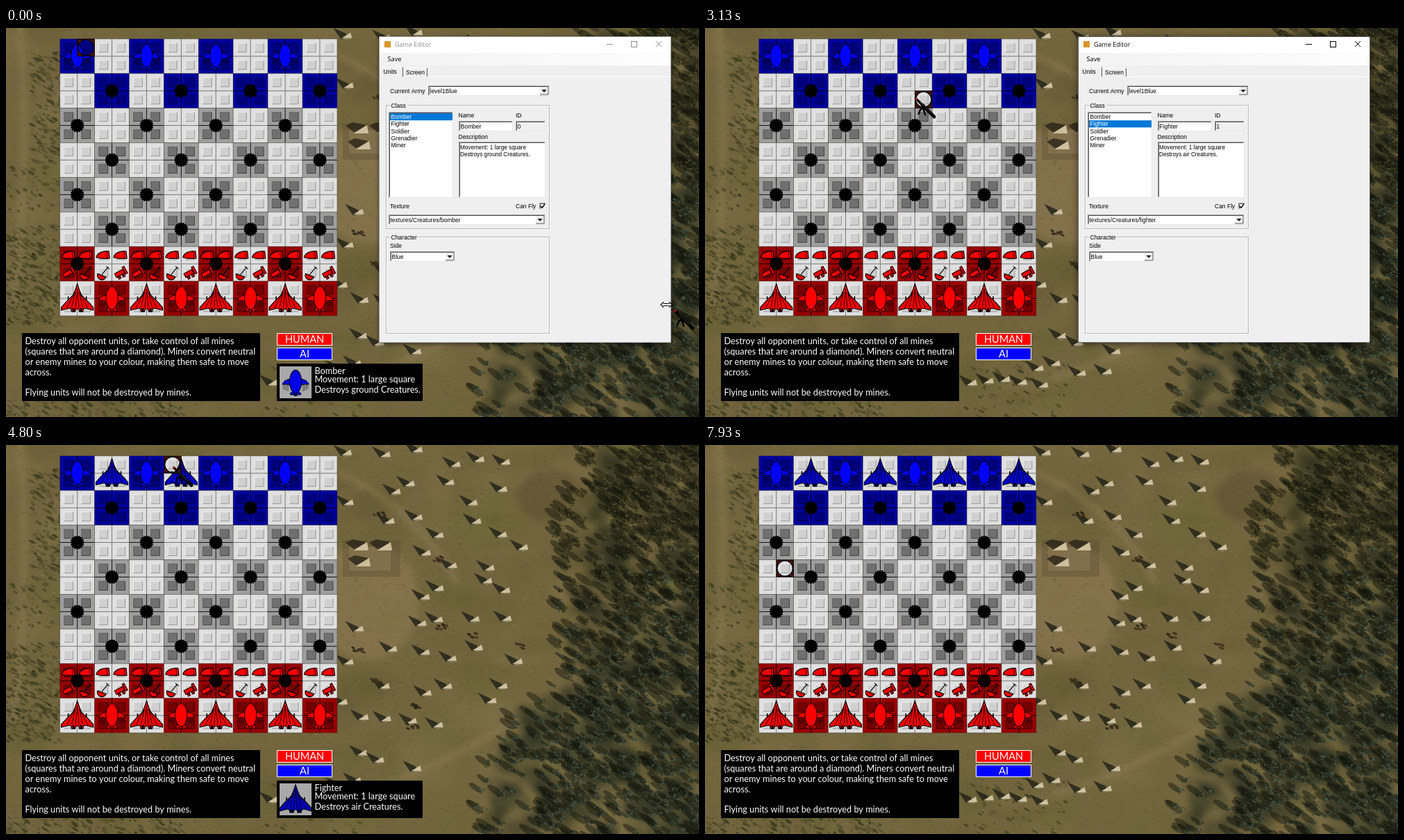
Recreate the animation shown at these times as an HTML page with a canvas. Size 998 px wide and 561 px high, loop 8000 ms.

```html
<!DOCTYPE html>
<html lang="en">
<head>
<meta charset="utf-8">
<title>Board game editor</title>
<style>
html, body { margin: 0; width: 100%; height: 100%; overflow: hidden; background: #6c6039; }
canvas { display: block; }
</style>
</head>
<body>
<canvas id="stage" width="998" height="561"></canvas>
<script>
const W = 998, H = 561, LOOP = 8000, STEP = 200 / 3;
const BX = 77.7, BY = 15.8, CELL = 49.9, HALF = CELL / 2;
const BLUE = '#0000ff', RED = '#ff0000';
const SANS = '"Liberation Sans", Arial, sans-serif';
const UI = '"Open Sans", sans-serif';
const GAME = 'Lato, sans-serif';
const stage = document.getElementById('stage').getContext('2d');

let seed = 7;
const rnd = () => (seed = (seed * 16807) % 2147483647) / 2147483647;
const span = (a, b) => a + (b - a) * rnd();
const pick = list => list[Math.floor(rnd() * list.length)];
const smooth = u => { u = Math.min(1, Math.max(0, u)); return u * u * (3 - 2 * u); };
const repeat = (n, f) => { for (let i = 0; i < n; i++) f(i); };

function layer(paint) {
  const cv = document.createElement('canvas');
  cv.width = W; cv.height = H;
  paint(cv.getContext('2d'));
  return cv;
}
function rect(g, x, y, w, h, fill, line) {
  if (fill) { g.fillStyle = fill; g.fillRect(x, y, w, h); }
  if (line) { g.strokeStyle = line; g.lineWidth = 1; g.strokeRect(x + .5, y + .5, w - 1, h - 1); }
}
function poly(g, pts, fill, line, width = 1) {
  g.beginPath();
  pts.forEach(([x, y]) => g.lineTo(x, y));
  g.closePath();
  if (fill) { g.fillStyle = fill; g.fill(); }
  if (line) { g.strokeStyle = line; g.lineWidth = width; g.stroke(); }
}
function stroke(g, pts, color, width = 1) {
  g.beginPath();
  pts.forEach(([x, y]) => g.lineTo(x, y));
  g.strokeStyle = color; g.lineWidth = width;
  g.stroke();
}
function oval(g, x, y, rx, ry, fill, line, width = 1, turn = 0) {
  g.beginPath();
  g.ellipse(x, y, rx, ry, turn, 0, 7);
  if (fill) { g.fillStyle = fill; g.fill(); }
  if (line) { g.strokeStyle = line; g.lineWidth = width; g.stroke(); }
}
function text(g, s, x, y, size, font, color = '#000', align = 'left') {
  g.font = size + 'px ' + font;
  g.textAlign = align;
  g.fillStyle = color;
  g.fillText(s, x, y);
}
function at(g, x, y, scale, paint) {
  g.save();
  g.translate(x, y); g.scale(scale, scale);
  paint(g);
  g.restore();
}

// ---------- terrain ----------
const forestEdge = y => 793 + 33 * Math.exp(-y / 60) - 115 * smooth((y - 310) / 160) + 10 * Math.sin(y / 23);

function ground(g) {
  rect(g, 0, 0, W, H, '#72653e');
  repeat(450, () => {
    g.globalAlpha = span(.08, .28);
    oval(g, rnd() * W, rnd() * H, span(10, 50), span(8, 30), pick(['#5f5630', '#84744c', '#786a42', '#66642f']));
  });
  g.globalAlpha = .5;
  oval(g, 520, 225, 75, 85, '#937d56');
  oval(g, 785, 75, 50, 38, '#5f4e33');
  g.lineWidth = 8; g.strokeStyle = '#94815a';
  g.beginPath();
  g.moveTo(478, 40); g.quadraticCurveTo(590, 90, 650, 200);
  g.moveTo(500, 505); g.quadraticCurveTo(620, 470, 740, 392);
  g.moveTo(20, 0); g.quadraticCurveTo(35, 200, 10, 400);
  g.stroke();
  repeat(500, () => {
    const y = rnd() * H, x = forestEdge(y) + 25 + rnd() * 320;
    g.globalAlpha = span(.2, .45);
    oval(g, x, y, span(8, 28), span(6, 18), y > 240 ? '#20271c' : '#25261a', 0, 1, .5);
  });
  g.globalAlpha = 1;
  g.filter = 'blur(5px)';
  g.drawImage(g.canvas, 0, 0);
  g.filter = 'none';
  repeat(6500, () => {
    g.globalAlpha = span(.05, .2);
    rect(g, rnd() * W, rnd() * H, span(1, 5), span(1, 3), pick(['#3c3a1c', '#a08e64', '#50502a']));
  });
  g.globalAlpha = 1;
}
function grove(g, x, y, w, h, n) {
  repeat(n, () => {
    g.globalAlpha = span(.25, .7);
    oval(g, x + rnd() * w, y + rnd() * h, span(1.5, 6), span(1, 2.3),
      pick(['#2c2f18', '#3b3d1f', '#474722', '#6a623b']), 0, 1, .5);
  });
  g.globalAlpha = 1;
}
function tree(g, x, y, s) {
  const cool = rnd() < (y - 120) / 260;
  g.globalAlpha = .45;
  oval(g, x - s, y - s * .6, s * 1.7, s * .6, '#11140c', 0, 1, .6);
  repeat(16, () => {
    const a = rnd() * 7, d = s * rnd();
    g.globalAlpha = span(.25, .75);
    oval(g, x + d * Math.cos(a), y + d * Math.sin(a) * .8, span(.7, 2.4), span(.6, 1.6),
      pick(cool ? ['#1c231a', '#2d382a', '#3e4a3a', '#53614f'] : ['#1d1f13', '#35341e', '#474225', '#5d532f']), 0, 1, .6);
  });
}
function forest(g) {
  repeat(1250, () => {
    const y = rnd() * (H + 10), x0 = forestEdge(y), x = x0 + rnd() * (W + 8 - x0);
    if (x - x0 > 80 || rnd() < .5) tree(g, x, y, span(3, 9));
  });
  g.globalAlpha = 1;
}
function tent(g, x, y) {
  g.globalAlpha = .85;
  poly(g, [[x + 2, y + 4], [x - 9, y + 4], [x - 20, y - 12], [x - 2, y - 4]], '#25241a');
  g.globalAlpha = 1;
  poly(g, [[x - 8, y + 3], [x + 5, y - 5], [x + 7, y + 3]], '#cdc1a0');
  poly(g, [[x - 8, y + 3], [x + 7, y + 3], [x - 1, y + 5]], '#8f8564');
}
function camp(g) {
  repeat(66, i => {
    const x = 500 + (i % 6) * 46 + span(-16, 16), y = 20 + Math.floor(i / 6) * 48 + span(-16, 16);
    const bare = x < 590 && y > 115 && y < 255;
    if (!bare && x < forestEdge(y) - 50) tent(g, x, y);
  });
  repeat(6, i => tent(g, 385 + i * 24, 497 + span(-16, 16)));
  repeat(9, () => {
    const x = span(490, 750), y = span(45, 440);
    repeat(8, () => oval(g, x + span(-8, 8), y + span(-4, 4), 3, 1.5, pick(['#2c2a18', '#4a3521']), 0, 1, .4));
  });
  rect(g, 485, 137, 83, 53, 'rgba(92,76,48,.4)');
  rect(g, 494, 147, 60, 34, 'rgba(140,122,86,.6)');
  [[511, 146], [545, 146], [514, 169]].forEach(([x, y]) => {
    poly(g, [[x - 8, y + 6], [x - 22, y - 5], [x - 12, y - 10], [x + 8, y - 6]], 'rgba(36,32,20,.75)');
    poly(g, [[x - 11, y + 6], [x + 9, y - 6], [x + 11, y + 6]], '#cdbf9c');
  });
}
function terrain(g) {
  ground(g);
  grove(g, 36, 35, 45, 160, 230);
  grove(g, 0, 195, 82, 70, 70);
  grove(g, 0, 285, 82, 145, 400);
  grove(g, 0, 538, 260, 23, 160);
  grove(g, 375, 480, 150, 80, 70);
  forest(g);
  camp(g);
}

// ---------- units, drawn in a 50 x 50 box around the origin ----------
function bomber(g, col) {
  for (const s of [-1, 1]) {
    repeat(4, i => stroke(g, [[s * (11 + i * 2.2), 2], [s * (11 + i * 2.2), 13 - i]], 'rgba(0,0,0,.7)', .8));
    g.beginPath();
    g.moveTo(s * 7, -5);
    g.quadraticCurveTo(s * 17, -4, s * 19, 3);
    g.quadraticCurveTo(s * 13, 2, s * 8, 4);
    g.fillStyle = col; g.fill();
    g.strokeStyle = '#000'; g.lineWidth = .9; g.stroke();
    poly(g, [[s * 2, 12], [s * 8, 16], [s * 7, 18], [s * 2, 18]], col, '#000', .9);
  }
  rect(g, -2, 14, 4, 6, col, '#000');
  oval(g, 0, -1, 8.7, 17, col, '#000', 1);
  g.beginPath();
  g.arc(0, -11, 5, Math.PI, 0);
  g.strokeStyle = 'rgba(0,0,0,.5)'; g.lineWidth = 1; g.stroke();
}
function fighter(g, col) {
  const side = [[3, -12], [6, -5], [16, 5], [23, 13], [23, 17], [12, 14], [9, 15], [8, 19], [3, 19], [2, 15]];
  const back = side.map(([x, y]) => [-x, y]).reverse();
  for (const s of [-1, 1]) stroke(g, [[s * 13, -3], [s * 13, 8]], '#000', 1.6);
  poly(g, [[0, -21], ...side, ...back], col, '#000', 1.2);
  for (const s of [-1, 1]) {
    for (const x of [8, 15]) stroke(g, [[s * 3, -9], [s * x, 13]], '#000', .9);
    rect(g, s * 5.5 - 1.5, 14, 3, 5, '#000');
  }
  stroke(g, [[-2.5, 13], [0, -14], [2.5, 13]], '#000', .9);
}
function shell(g, col) {
  g.beginPath();
  g.moveTo(8, -5.5);
  g.bezierCurveTo(0, -7, -9, -3, -10, 3);
  g.bezierCurveTo(-6, 5, 0, 5, 9, 4.5);
  g.closePath();
  g.fillStyle = col; g.fill();
  g.strokeStyle = '#000'; g.lineWidth = 1.2; g.stroke();
  stroke(g, [[5, -5], [6, 4]], '#000', .8);
}
function cannon(g, col) {
  g.rotate(-.5);
  rect(g, -9, -3, 14, 7, col, '#000');
  rect(g, 5, -6, 4, 12, col, '#000');
  rect(g, -7, 4, 4, 4, col, '#000');
  rect(g, 0, 4, 4, 4, col, '#000');
}
function shovel(g, col) {
  stroke(g, [[7, -8], [-2, 3]], '#000', 1.1);
  stroke(g, [[4, -9], [9, -5]], '#000', 1.1);
  g.beginPath();
  g.arc(-2, 4, 6.5, .4, 3.5);
  g.closePath();
  g.fillStyle = col; g.fill();
  g.strokeStyle = '#000'; g.lineWidth = 1.2; g.stroke();
}

// ---------- board ----------
const mid = n => n * CELL + HALF;
const unit = (g, paint, c, r, col) => at(g, BX + mid(c), BY + mid(r), 1, q => paint(q, col));

function tile(g, c, r) {
  const x = BX + c * CELL, y = BY + r * CELL, dark = (c + r) % 2 === 0;
  const [base, inner] = !dark ? ['#dfdfdf', '#d0d0d0']
    : r < 2 ? ['#00009c', '#00007c'] : r > 5 ? ['#980000', '#740000'] : ['#9e9e9e', '#707070'];
  rect(g, x, y, CELL, CELL, base);
  repeat(4, i => {
    const sx = x + (i % 2) * HALF + 6, sy = y + (i >> 1) * HALF + 6;
    rect(g, sx, sy, 13, 13, inner);
    stroke(g, [[sx, sy + 13], [sx, sy], [sx + 13, sy]], dark ? 'rgba(0,0,0,.25)' : '#ececec');
    stroke(g, [[sx + 13, sy], [sx + 13, sy + 13], [sx, sy + 13]], dark ? 'rgba(0,0,0,.5)' : '#999');
  });
  const mx = x + HALF, my = y + HALF, ink = dark ? 'rgba(0,0,0,.9)' : '#777';
  stroke(g, [[mx, y], [mx, y + CELL]], ink);
  stroke(g, [[x, my], [x + CELL, my]], ink);
  g.strokeStyle = 'rgba(40,40,40,.5)'; g.lineWidth = .7;
  g.strokeRect(x, y, CELL, CELL);
  if (dark && r > 0 && r < 7) {
    const star = Array.from({ length: 32 }, (_, i) => {
      const a = i * Math.PI / 16, d = i % 2 ? 8.8 : 10.4;
      return [mx + d * Math.cos(a), my + d * Math.sin(a)];
    });
    poly(g, star, '#000');
  }
}
function board(g) {
  repeat(64, i => tile(g, i % 8, i >> 3));
  repeat(8, c => {
    const odd = c % 2;
    const squad = [shell, shell, odd ? shovel : cannon, odd ? cannon : shovel];
    squad.forEach((paint, i) => unit(g, paint, c - .25 + (i % 2) / 2, 5.75 + (i >> 1) / 2, RED));
    unit(g, odd ? bomber : fighter, c, 7, RED);
    if (!odd) unit(g, bomber, c, 0, BLUE);
  });
}
function captions(g) {
  rect(g, 23, 440, 343, 98, '#000');
  ['Destroy all opponent units, or take control of all mines',
   '(squares that are around a diamond). Miners convert neutral',
   'or enemy mines to your colour, making them safe to move',
   'across.', '', 'Flying units will not be destroyed by mines.'
  ].forEach((s, i) => text(g, s, 27.5, 456.3 + i * 14.8, 12.7, GAME, '#fff'));
  [['HUMAN', 440, RED], ['AI', 461, BLUE]].forEach(([s, y, col]) => {
    rect(g, 390, y, 80, 18, col, '#fff');
    text(g, s, 430, y + 14, 14.5, GAME, '#fff', 'center');
  });
}

// ---------- editor window ----------
const label = (g, s, x, y, col) => text(g, s, x, y, 8.5, SANS, col);
function field(g, x, y, w, h, fill = '#fff') {
  rect(g, x, y, w, h, fill, '#a0a0a0');
  stroke(g, [[x + 1.5, y + h - 1.5], [x + 1.5, y + 1.5], [x + w - 1.5, y + 1.5]], '#555');
  stroke(g, [[x + w - .5, y], [x + w - .5, y + h - .5], [x, y + h - .5]], '#e8e8e8');
}
function combo(g, x, y, w, s) {
  field(g, x, y, w, 15);
  label(g, s, x + 2.5, y + 10.7);
  const bx = x + w - 14;
  rect(g, bx, y + 2, 12, 11, '#f0f0f0');
  stroke(g, [[bx + 12, y + 2], [bx + 12, y + 13], [bx, y + 13]], '#555');
  poly(g, [[bx + 2.5, y + 6], [bx + 9.5, y + 6], [bx + 6, y + 9.7]], '#000');
}
function group(g, x, y, w, h, s, sw) {
  g.strokeStyle = '#fff'; g.lineWidth = 1; g.strokeRect(x + 1.5, y + 1.5, w - 1, h - 1);
  g.strokeStyle = '#b4b4b4'; g.strokeRect(x + .5, y + .5, w - 1, h - 1);
  rect(g, x + 6, y - 2, sw, 6, '#efefef');
  label(g, s, x + 7.5, y + 3.5);
}
function tab(g, s, x, y, w) {
  stroke(g, [[x, y + .5], [x + w, y + .5]], '#fff');
  stroke(g, [[x + w + .5, y + 1], [x + w + .5, 70]], '#555');
  label(g, s, x + 4, y + 10);
}
function frame(g, on) {
  g.save();
  g.shadowColor = 'rgba(0,0,0,.5)'; g.shadowBlur = on ? 10 : 6; g.shadowOffsetY = 2;
  rect(g, 537, 12, 421, 442, '#efefef');
  g.restore();
  rect(g, 537, 12, 421, 24, '#fff');
  const strip = g.createLinearGradient(537, 0, 957, 0);
  strip.addColorStop(0, '#f2f2f2'); strip.addColorStop(1, '#fdfdfd');
  rect(g, 538, 36, 419, 18, strip);
  rect(g, 537, 12, 421, 442, null, on ? '#5c5c5c' : '#9a9a9a');
  rect(g, 545, 19, 9, 9, '#d9952c');
  const ink = on ? '#000' : '#8c8c8c';
  text(g, 'Game Editor', 560, 27.2, 9, UI, ink);
  stroke(g, [[865, 23.5], [874, 23.5]], ink);
  rect(g, 900, 19, 9, 9, null, ink);
  stroke(g, [[936, 19], [944, 27]], ink);
  stroke(g, [[944, 19], [936, 27]], ink);
  text(g, 'Save', 549.5, 48, 9.2, UI);
  stroke(g, [[607, 70.5], [957, 70.5]], '#fff');
  tab(g, 'Units', 539.5, 55.5, 31.5);
  tab(g, 'Screen', 572, 57, 34);
}
function editor(g, on) {
  const row = on ? 1 : 0, name = on ? 'Fighter' : 'Bomber';
  frame(g, on);
  label(g, 'Current Army', 553, 93.5);
  combo(g, 608, 83, 175, 'level1Blue');
  group(g, 547, 111, 236, 179, 'Class', 25);
  field(g, 551, 121, 93, 124);
  rect(g, 553, 123 + row * 10.2, 90, 10.2, '#0078d7');
  ['Bomber', 'Fighter', 'Soldier', 'Grenadier', 'Miner'].forEach((s, i) =>
    label(g, s, 554.5, 131.2 + i * 10.2, i === row ? '#fff' : '#000'));
  label(g, 'Name', 651.5, 129.3);
  field(g, 652, 134, 78, 15);
  label(g, name, 654.5, 144.5);
  label(g, 'ID', 734, 129.3);
  field(g, 734, 134, 43, 15, '#f0f0f0');
  label(g, row, 736.5, 144.5);
  label(g, 'Description', 651.5, 159.8);
  field(g, 652, 164, 125, 81);
  text(g, 'Movement: 1 large square', 654, 174.5, 8.2, SANS);
  text(g, on ? 'Destroys air Creatures.' : 'Destroys ground Creatures.', 654, 184.7, 8.2, SANS);
  label(g, 'Texture', 553, 259.5);
  label(g, 'Can Fly', 734, 259.5);
  field(g, 768, 252, 10, 10);
  stroke(g, [[770, 257], [772, 259.3], [776, 254]], '#000', 1.5);
  combo(g, 551, 269, 226, 'textures/Creatures/' + name.toLowerCase());
  group(g, 547, 301, 236, 140, 'Character', 41);
  label(g, 'Side', 553, 317.3);
  combo(g, 553, 322, 94, 'Blue');
}

// ---------- pointers ----------
function arrow(g) {
  poly(g, [[0, 0], [0, 13], [3, 10.3], [5, 15], [7, 14.2], [5, 9.6], [9, 9.4]], '#fff', '#000', .9);
}
function resizer(g) {
  for (const [col, w, tip] of [['#000', 4, 9], ['#fff', 2, 7.5]]) {
    stroke(g, [[-5, 0], [5, 0]], col, w);
    for (const s of [-1, 1]) poly(g, [[s * tip, 0], [s * 4, w + .5], [s * 4, -w - .5]], col);
  }
}
function gun(g) {
  g.lineCap = 'round';
  stroke(g, [[1.5, 1.5], [12, 12]], '#000', 3.4);
  stroke(g, [[10, 10], [27, 27]], '#000', 4.8);
  stroke(g, [[4.5, 23], [7, 17], [11, 14], [14, 24]], '#000', 2.4);
  stroke(g, [[7, 6], [22, 21]], '#5b5548', .8);
  oval(g, 1.5, 1.5, 1.6, 1.6, '#d01818');
}

// ---------- motion, in steps of the loop ----------
const SELECT = 40, PLACED = [59, 72, 84, 95], HIDE = PLACED[0];
const dropX = i => 139 + i * 101;
const hops = PLACED.slice(1).flatMap((_, i) => [[PLACED[i] + 2, dropX(i), 31], [PLACED[i] + 8, dropX(i + 1), 31]]);
const PATH = [
  [0, 951, 399], [3, 759, 211], [7, 759, 211], [20, 587, 152], [27, 575, 138.5], [41, 575, 138.5],
  [47, 303, 101], [58, dropX(0), 31], ...hops, [114, dropX(3), 31], [117, 115, 176], [119, -45, 248]
];

function pointer(k) {
  const i = Math.max(1, PATH.findIndex(p => p[0] >= k));
  const [k0, x0, y0] = PATH[i - 1], [k1, x1, y1] = PATH[i];
  const e = smooth((k - k0) / (k1 - k0));
  return [x0 + (x1 - x0) * e, y0 + (y1 - y0) * e];
}
// The marker stays on the last square the pointer visited.
function marked(k) {
  for (; k > 0; k--) {
    const [x, y] = pointer(k), c = Math.floor((x - BX) / HALF), r = Math.floor((y - BY) / HALF);
    if (c >= 0 && c < 16 && r >= 0 && r < 16) return [c, r];
  }
  return [1, 0];
}
function marker(g, c, r) {
  const x = BX + c * HALF, y = BY + r * HALF, m = HALF / 2;
  g.beginPath();
  g.rect(x, y, HALF, HALF);
  g.arc(x + m, y + m, 11.5, 0, 7);
  g.fillStyle = '#4c1408';
  g.fill('evenodd');
  rect(g, x, y, HALF, HALF, null, '#000');
  oval(g, x + m, y + m, 11.3, 11.3, null, '#06060c', 1.5);
}
function info(g, name) {
  const isBomber = name === 'Bomber';
  rect(g, 390, 484, 210, 54, '#000');
  rect(g, 394, 488, 46, 46, '#a9a9a9');
  at(g, 417, 511, 1, q => isBomber ? bomber(q, '#0000e8') : fighter(q, '#0000c0'));
  [[name, 499], ['Movement: 1 large square', 511.3], [`Destroys ${isBomber ? 'ground' : 'air'} Creatures.`, 526]]
    .forEach(([s, y]) => text(g, s, 444.5, y, 12.7, GAME, '#fff'));
}

const scene = layer(g => { terrain(g); board(g); captions(g); });
const idle = layer(g => editor(g, false));
const active = layer(g => editor(g, true));

function draw(k) {
  const g = stage;
  g.drawImage(scene, 0, 0);
  const placed = PLACED.filter(p => k >= p).map((_, i) => 2 * i + 1);
  placed.forEach(c => unit(g, fighter, c, 0, '#0000d8'));
  const [c, r] = marked(k), col = c >> 1;
  marker(g, c, r);
  if (r < 2) {
    if (col % 2 === 0) info(g, 'Bomber');
    else if (placed.includes(col)) info(g, 'Fighter');
  }
  if (k < HIDE) g.drawImage(k < SELECT ? idle : active, 0, 0);
  const [x, y] = pointer(k);
  if (k === 0) {
    at(g, x, y, 1, resizer);
    at(g, x + 11, y + 7, 1, gun);
  } else at(g, x, y, 1, k < HIDE && x > 537 ? arrow : gun);
}

let shown = -1;
const start = performance.now();
function tick() {
  const t = (performance.now() - start) % LOOP;
  const k = Math.min(119, Math.floor((t + 3.4) / STEP));
  if (k !== shown) draw(shown = k);
  requestAnimationFrame(tick);
}
tick();
</script>
</body>
</html>
```
